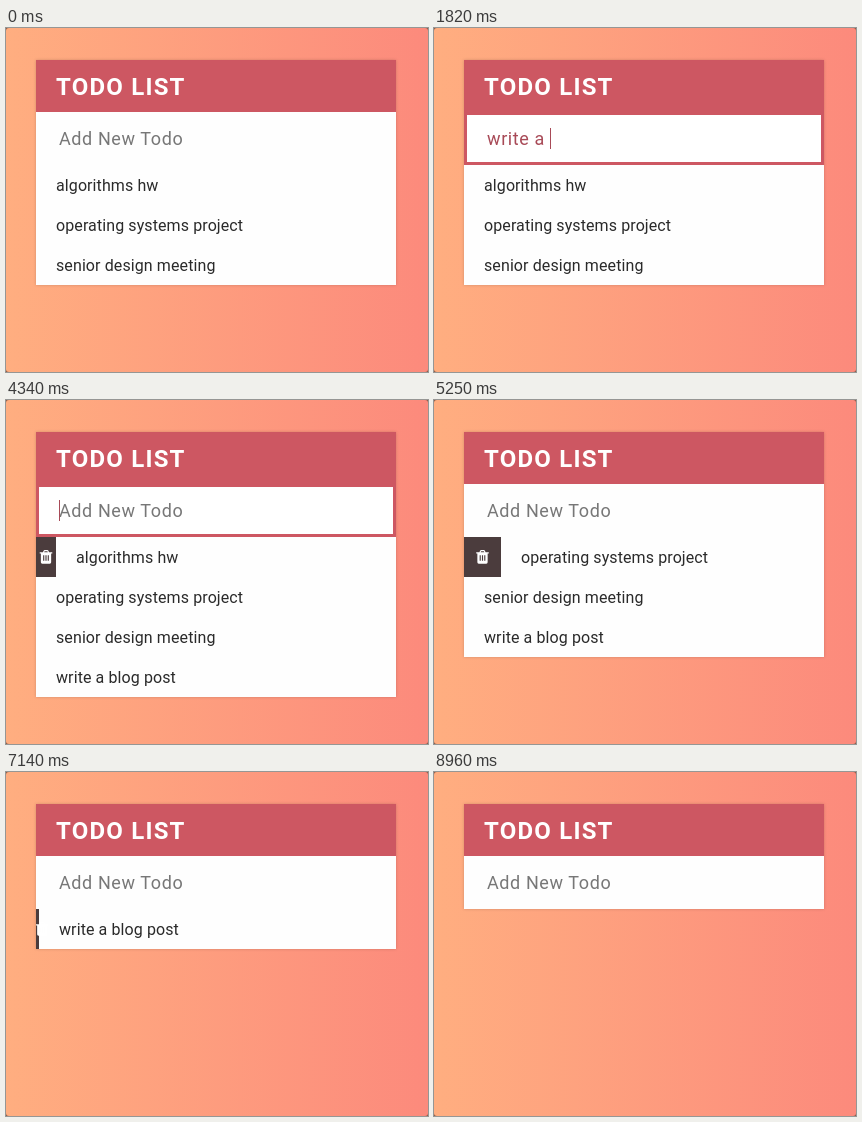
An HTML page that plays this animation: 422 by 344 pixels, repeating every 9660 ms.

```html
<!DOCTYPE html>
<html lang="en">
<head>
<meta charset="utf-8">
<title>Todo list</title>
<style>
  html, body { margin: 0; width: 100%; height: 100%; overflow: hidden; background: #8a5a48; }
  svg { display: block; width: 422px; height: 344px; }
  text { font-family: Roboto, Arial, sans-serif; white-space: pre; }
  .title { font-size: 24px; font-weight: 700; letter-spacing: 1.2px; fill: #fff; }
  .field { font-size: 18px; letter-spacing: .6px; }
  .item { font-size: 16px; letter-spacing: .1px; fill: #2a2a2a; }
  .card { filter: drop-shadow(0 0 1.5px rgba(0, 0, 0, .18)); }
</style>
</head>
<body>
<svg viewBox="0 0 422 344">
  <defs>
    <linearGradient id="sky">
      <stop offset="0" stop-color="#ffae80"/>
      <stop offset="1" stop-color="#fc8a7c"/>
    </linearGradient>
  </defs>
  <rect width="422" height="344" rx="3" fill="url(#sky)"/>
  <rect id="card" class="card" x="30" y="32" width="360" height="225" fill="#fefefe"/>
  <rect x="30" y="32" width="360" height="52" fill="#cd5762"/>
  <text class="title" x="50" y="67">TODO LIST</text>
  <rect id="focus" x="31.5" y="85.5" width="357" height="50" fill="#fff" stroke="#cd5762" stroke-width="3"/>
  <text id="hint" class="field" x="53" y="117" fill="#777">Add New Todo</text>
  <text id="typed" class="field" x="53" y="117" fill="#a84a57"></text>
  <rect id="caret" y="100" width="1" height="21" fill="#a84a57"/>
  <g id="rows"></g>
  <g id="trash">
    <rect id="cell" x="30" y="137" height="40" fill="#4b3c3d"/>
    <path id="icon" fill="#fff" fill-rule="evenodd" d="M0 2H2.8L3.4 .6Q3.7 0 4.3 0H6.7Q7.3 0 7.6 .6L8.2 2H11V3H10V10.7Q10 12 8.8 12H2.2Q1 12 1 10.7V3H0ZM3.9 2H7.1L6.7 1H4.3ZM3 4.5V9.5H4V4.5ZM5 4.5V9.5H6V4.5ZM7 4.5V9.5H8V4.5Z"/>
  </g>
</svg>
<script>
const LOOP = 9660, STEP = 70, ROW = 40, TOP = 137;
const FOCUS = 840, ENTER = 3190, BLUR = 5040;
const ITEMS = ['algorithms hw', 'operating systems project', 'senior design meeting', 'write a blog post'];
const ENTRY = ITEMS[3];
const KEYS = [1190, 1260, 1400, 1470, 1540, 1610, 1750, 1820, 1960,
              2030, 2170, 2240, 2310, 2450, 2520, 2730, 2870];
const HOVERS = [4240, 5065, 6090, 7125];
const REMOVALS = [5040, 6090, 7125, 8400];

const el = id => document.getElementById(id);
const show = (node, on) => node.setAttribute('display', on ? 'inline' : 'none');
const past = (times, t) => times.filter(at => at <= t).length;

const rows = ITEMS.map(label => {
  const row = document.createElementNS('http://www.w3.org/2000/svg', 'text');
  row.setAttribute('class', 'item');
  row.textContent = label;
  return el('rows').appendChild(row);
});

function drawField(t) {
  const focused = t >= FOCUS && t < BLUR;
  const count = t < ENTER ? past(KEYS, t) : 0;
  const lastInput = t >= ENTER ? ENTER : count ? KEYS[count - 1] : FOCUS;
  const blinkOn = Math.floor((t - lastInput) / 500) % 2 === 0;
  el('typed').textContent = ENTRY.slice(0, count);
  show(el('focus'), focused);
  show(el('hint'), !count);
  show(el('caret'), focused && blinkOn);
  el('caret').setAttribute('x', Math.round(53 + (count ? el('typed').getComputedTextLength() : 0)));
}

function drawList(t) {
  const gone = past(REMOVALS, t);
  const total = t < ENTER ? 3 : 4;
  const slide = gone < 4 ? Math.max(0, Math.min(ROW, (t - HOVERS[gone]) / 5)) : 0;
  rows.forEach((row, i) => {
    show(row, i >= gone && i < total);
    row.setAttribute('x', 50 + (i === gone ? slide : 0));
    row.setAttribute('y', TOP + (i - gone) * ROW + 26);
  });
  el('card').setAttribute('height', 105 + (total - gone) * ROW);
  show(el('trash'), slide > 0);
  el('cell').setAttribute('width', slide);
  // The icon is centred until the cell is narrower than the icon.
  const left = 30 + Math.max(0, (slide - 12.57) / 2);
  el('icon').setAttribute('transform', `translate(${left} 150) scale(1.143)`);
}

function draw(ms) {
  const t = Math.floor((ms % LOOP) / STEP) * STEP;
  drawField(t);
  drawList(t);
}

const start = performance.now();
function tick() {
  draw(performance.now() - start);
  requestAnimationFrame(tick);
}
tick();
</script>
</body>
</html>
```
